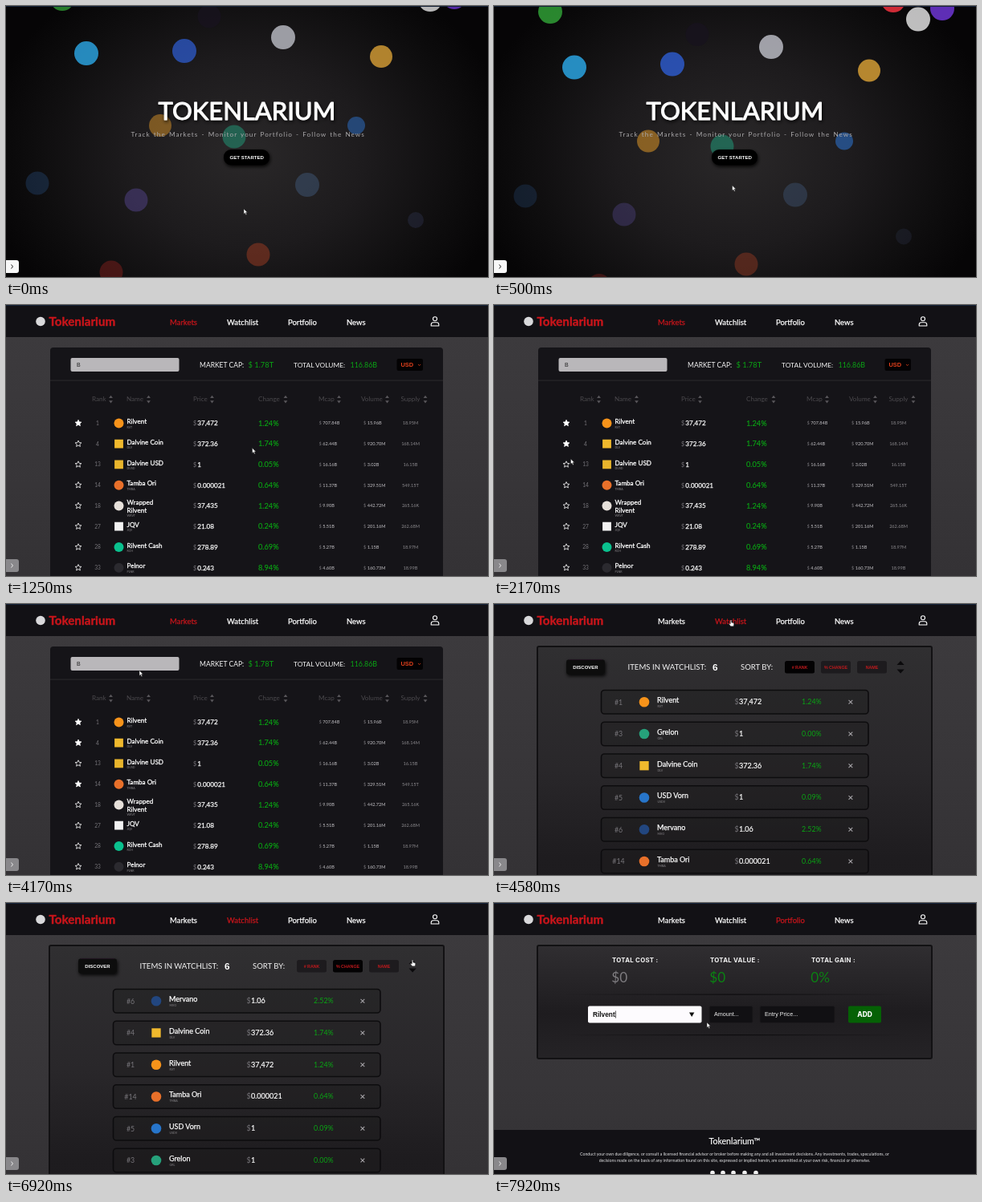
An HTML page that plays this animation: 600x338 px, repeating every 8000 ms.

```html
<!DOCTYPE html>
<html lang="en">
<head>
<meta charset="utf-8">
<title>Tokenlarium</title>
<style>
html, body { margin: 0; width: 100%; height: 100%; overflow: hidden; background: #111; }
svg { display: block; width: 100vw; height: 100vh; }
text { font-family: Lato, "Open Sans", sans-serif; white-space: pre; }
.ui { font-family: "Liberation Sans", Arial, sans-serif; }
.wide { font-family: Inter, sans-serif; }
</style>
</head>
<body>
<svg id="stage" viewBox="0 0 600 338" preserveAspectRatio="none">
  <defs>
    <radialGradient id="night" gradientUnits="userSpaceOnUse" cx="300" cy="185" r="330" gradientTransform="translate(0 40) scale(1 .78)">
      <stop offset="0" stop-color="#2a2829"/><stop offset=".45" stop-color="#1d1b1d"/>
      <stop offset=".8" stop-color="#0e0d0e"/><stop offset="1" stop-color="#060506"/>
    </radialGradient>
    <linearGradient id="page" x2="0" y2="1">
      <stop offset="0" stop-color="#3d3b3e"/><stop offset="1" stop-color="#343235"/>
    </linearGradient>
    <linearGradient id="board" x2="0" y2="1">
      <stop offset="0" stop-color="#302f31"/><stop offset=".5" stop-color="#29272a"/>
      <stop offset=".85" stop-color="#1e1c1f"/><stop offset="1" stop-color="#1d1b1e"/>
    </linearGradient>
    <linearGradient id="card" x2="0" y2="1">
      <stop offset="0" stop-color="#302e31"/><stop offset=".6" stop-color="#1e1c1f"/>
      <stop offset="1" stop-color="#252326"/>
    </linearGradient>
    <linearGradient id="rule">
      <stop offset="0" stop-color="#0c0b0d" stop-opacity="0"/><stop offset=".5" stop-color="#0c0b0d"/>
      <stop offset="1" stop-color="#0c0b0d" stop-opacity="0"/>
    </linearGradient>
    <filter id="drop" x="-20%" y="-40%" width="140%" height="200%">
      <feDropShadow dx="1" dy="2" stdDeviation="2" flood-color="#000" flood-opacity=".9"/>
    </filter>
  </defs>
</svg>
<script>
const LOOP = 8000;
const RED = '#c8151b', GREEN = '#0aa414', GREY = '#77757a', WHITE = '#f4f4f4';
const stage = document.getElementById('stage');

const text = (x, y, s, size, fill = WHITE, attrs = '') =>
  `<text x="${x}" y="${y}" font-size="${size}" fill="${fill}" ${attrs}>${s}</text>`;
const rect = (x, y, w, h, fill, attrs = '') =>
  `<rect x="${x}" y="${y}" width="${w}" height="${h}" fill="${fill}" ${attrs}/>`;
const dot = (x, y, r, fill, attrs = '') =>
  `<circle cx="${x}" cy="${y}" r="${r}" fill="${fill}" ${attrs}/>`;
const path = (d, attrs) => `<path d="${d}" ${attrs}/>`;
const firm = (color, w) => `stroke="${color}" stroke-width="${w}" stroke-linejoin="round"`;
const MID = 'text-anchor="middle"', BOLD = 'font-weight="700"', UI = 'class="ui"', WIDE = 'class="wide"';

function scene(markup) {
  const g = document.createElementNS('http://www.w3.org/2000/svg', 'g');
  g.innerHTML = markup;
  stage.appendChild(g);
  return g;
}
const show = (el, on) => el.setAttribute('display', on ? 'inline' : 'none');

// name, ticker, icon colour, square icon
const assets = {
  rvt: ['Rilvent', 'RVT', '#f7931a'],
  dlv: ['Dalvine Coin', 'DLV', '#f0b92d', 1],
  dusd: ['Dalvine USD', 'DUSD', '#e9b52c', 1],
  tmba: ['Tamba Ori', 'TMBA', '#e8702a'],
  wrvt: ['Wrapped|Rilvent', 'WRVT', '#e6e0da'],
  jqv: ['JQV', 'JQV', '#f2f2f2', 1],
  rch: ['Rilvent Cash', 'RCH', '#0ac18e'],
  plnr: ['Pelnor', 'PLNR', '#2b2a2f'],
  mvo: ['Mervano', 'MVO', '#22467f'],
  usdv: ['USD Vorn', 'USDV', '#2775ca'],
  grl: ['Grelon', 'GRL', '#26a17b']
};
const icon = (id, x, y, r) => assets[id][3]
  ? rect(x - r * .9, y - r * .9, r * 1.8, r * 1.8, assets[id][2])
  : dot(x, y, r, assets[id][2]);

// Home: x, y, speed, radius, opacity at start, opacity after 1 s
const coins = [
  ['#2aa0dc', 100, 59, 35, 15, .85, .88], ['#2f5fd8', 222, 56, 33, 15, .7, .85],
  ['#17131d', 253, 13, 45, 14.5, .9, .9], ['#b4b5bd', 345, 39, 24, 15, .85, .9],
  ['#d9a036', 467, 63, 35, 14, .8, .85], ['#d99427', 192, 149, 39, 14, .5, .62],
  ['#1f9d7c', 284, 163, 24, 14.5, .5, .55], ['#2c6cc0', 436, 149, 39, 11, .55, .7],
  ['#23466f', 39, 221, 32, 14.5, .42, .24], ['#5a4a9a', 162, 242, 36, 14.5, .45, .24],
  ['#405878', 375, 223, 25, 15, .5, .35], ['#343a58', 510, 267, 41, 10, .35, .15],
  ['#a03c22', 314, 310, 24, 14.5, .5, .36], ['#9c241e', 131, 332, 33, 14.5, .4, .25],
  ['#2f9a35', 70, -9, 32, 15, .8, .95], ['#d8d8d8', 528, -8, 49, 15, .85, .9],
  ['#6c35cf', 558, -11, 28, 15, .8, .95], ['#e02f3a', 497, -22, 30, 15, .9, .95]
];

const toggle = (fill, ink) => rect(-3, 317, 19, 16, fill, 'rx="3"') +
  path('M6.5 322.5l2 2.5l-2 2.5', `fill="none" stroke="${ink}" stroke-width="1"`);

const home = scene(
  rect(0, 0, 600, 338, 'url(#night)') +
  '<g>' + coins.map(c => dot(c[1], c[2], c[4], c[0])).join('') + '</g>' +
  rect(0, 0, 600, 1, '#16243a') +
  text(300, 142, 'TOKENLARIUM', 31, '#fff', `${MID} ${firm('#fff', .9)} filter="url(#drop)"`) +
  text(155.5, 163, 'Track the Markets - Monitor your Portfolio - Follow the News', 8.2, '#aaa8aa',
    'letter-spacing="1.04" word-spacing="1"') +
  rect(271, 179, 57, 19.5, '#050405', 'rx="9" filter="url(#drop)"') +
  text(299.7, 190.8, 'GET STARTED', 6.1, '#fff', `${UI} ${BOLD} ${MID}`) +
  toggle('#f8f8f8', '#222'));
const coinDots = [...home.querySelector('g').children];

const tabs = [['Markets', 204], ['Watchlist', 275], ['Portfolio', 351], ['News', 424]];
function chrome(active) {
  return rect(0, 0, 600, 40, '#121115') + rect(0, 0, 600, 1, '#16243a') +
    dot(43, 20.5, 5.8, '#d9d9db') +
    text(53.5, 25.5, 'Tokenlarium', 15.2, RED, `${BOLD} ${firm(RED, .4)}`) +
    tabs.map(([s, x], i) => {
      const c = i === active ? RED : '#fff';
      return text(x, 24.6, s, 9.5, c, firm(c, .25));
    }).join('') +
    `<g fill="none" stroke="#fff" stroke-width="1.1">${dot(534, 17.2, 2.5, 'none')}` +
    path('M529.2 26v-1.4q0-2.8 2.8-2.8h4q2.8 0 2.8 2.8V26z', 'stroke-linejoin="round"') + '</g>';
}
const backdrop = rect(0, 0, 600, 338, 'url(#page)');
const sideTab = toggle('#89888b', '#e8e8e8');

// Markets
const heads = [['Rank', 107, 130.5], ['Name', 150, 177.5], ['Price', 233, 256.5], ['Change', 314, 348],
  ['Mcap', 389, 414.5], ['Volume', 442, 474.5], ['Supply', 491.5, 522]];
const quotes = [
  ['rvt', 1, '37,472', '1.24', '707.84B', '15.96B', '18.95M'],
  ['dlv', 4, '372.36', '1.74', '62.44B', '920.70M', '168.14M'],
  ['dusd', 13, '1', '0.05', '16.16B', '3.02B', '16.15B'],
  ['tmba', 14, '0.000021', '0.64', '11.37B', '329.51M', '549.15T'],
  ['wrvt', 18, '37,435', '1.24', '9.90B', '442.72M', '265.16K'],
  ['jqv', 27, '21.08', '0.24', '5.51B', '201.16M', '262.68M'],
  ['rch', 28, '278.89', '0.69', '5.27B', '1.15B', '18.97M'],
  ['plnr', 33, '0.243', '8.94', '4.60B', '160.73M', '18.99B']
];
function star(x, y) {
  let d = '';
  for (let k = 0; k < 10; k++) {
    const a = k * Math.PI / 5, r = k % 2 ? 1.9 : 4.1;
    d += (k ? 'L' : 'M') + (x + r * Math.sin(a)).toFixed(2) + ' ' + (y - r * Math.cos(a)).toFixed(2);
  }
  return path(d + 'z', 'class="star" fill="none" stroke="#fff" stroke-width=".8" stroke-linejoin="round"');
}
function quote([id, rank, price, change, cap, vol, supply], i) {
  const y = 147.4 + 25.75 * i, lines = assets[id][0].split('|'), two = lines.length > 1;
  const money = (x, s) => text(x, y + 2, `<tspan fill="${GREY}">$</tspan> ${s}`, 5.6, '#c4c2c6');
  return star(90, y) +
    text(114, y + 2.4, rank, 6.6, GREY, MID) + icon(id, 140.5, y, 6) +
    lines.map((s, k) => text(150.5, y + .8 + (two ? k * 9.6 - 1.8 : 0), s, 8.1, '#fff', firm('#fff', .3))).join('') +
    text(150.5, y + (two ? 13.6 : 6.2), assets[id][1], 3.6, '#8a888c') +
    text(233, y + 3, '$', 7, GREY) + text(238.3, y + 3, price, 8.1, '#fff', firm('#fff', .25)) +
    text(314, y + 3.2, change + '%', 9.2, GREEN, firm(GREEN, .15)) +
    money(389.5, cap) + money(445, vol) + text(503.5, y + 2, supply, 5.6, '#8e8c90', MID);
}
const markets = scene(backdrop + chrome(0) +
  rect(55, 53, 489, 300, '#151418', 'rx="4"') +
  rect(80.5, 66, 135, 17, '#b9b7ba', 'rx="2"') + text(88, 77.2, 'B', 7, '#222', UI) +
  text(241, 78.2, 'MARKET CAP:', 8.5) + text(301.5, 78.4, '$ 1.78T', 9.3, GREEN) +
  text(358, 78.2, 'TOTAL VOLUME:', 8.4) + text(428.5, 78.4, '116.86B', 8.9, GREEN) +
  rect(486.5, 67, 32.5, 15, '#030203', 'rx="2"') + text(491.5, 77.2, 'USD', 7.4, '#e2401c', `${UI} ${BOLD}`) +
  path('M513 74l1.6 1.6l1.6-1.6', 'fill="none" stroke="#e2401c" stroke-width=".8"') +
  rect(55, 93.6, 489, 1, '#2c2a2e') +
  heads.map(([s, x, a]) => text(x, 120.2, s, 8.1, '#4b494d') +
    path(`M${a - 2.4} 116l2.4-3.2l2.4 3.2zM${a - 2.4} 119.2l2.4 3.2l2.4-3.2z`, 'fill="#59575b"')).join('') +
  quotes.map(quote).join('') + sideTab);
const stars = markets.querySelectorAll('.star');

// Watchlist
const held = [
  ['mvo', 6, '1.06', '2.52'], ['dlv', 4, '372.36', '1.74'], ['rvt', 1, '37,472', '1.24'],
  ['tmba', 14, '0.000021', '0.64'], ['usdv', 5, '1', '0.09'], ['grl', 3, '1', '0.00']
];
const item = ([id, rank, price, change]) => '<g class="item">' +
  rect(133.5, 107.5, 332.5, 29.5, '#1b1a1c', 'fill-opacity=".35" rx="4" stroke="#0d0c0e" stroke-width="1.6"') +
  text(155, 125.6, '#' + rank, 8.8, GREY, MID) + icon(id, 187, 122.2, 6.3) +
  text(203, 123.2, assets[id][0], 9, '#fff', firm('#fff', .25)) +
  text(203.5, 129, assets[id][1], 3.6, '#8a888c') +
  text(299.5, 125.2, '$', 8.8, GREY) + text(305, 125.2, price, 9, '#fff', firm('#fff', .2)) +
  text(383, 125.2, change + '%', 8.9, GREEN) +
  path('M441.5 119.8l4.8 4.8m0-4.8l-4.8 4.8', 'stroke="#a3a1a5" stroke-width="1.1"') + '</g>';
const chips = [['# RANK', 362], ['% CHANGE', 407], ['NAME', 452]];
const watch = scene(backdrop + chrome(1) +
  rect(54, 53, 491, 310, 'url(#board)', 'rx="2" stroke="#121113" stroke-width="2"') +
  rect(90, 69.5, 48, 18.5, '#0e0d0f', 'rx="3" filter="url(#drop)"') +
  text(114, 81, 'DISCOVER', 6, '#fff', `${UI} ${BOLD} ${MID}`) +
  text(166.5, 82.2, 'ITEMS IN WATCHLIST:', 9.6) + text(272, 83, '6', 11.8, '#fff', `${UI} ${BOLD}`) +
  text(307, 82.2, 'SORT BY:', 9.5) +
  chips.map(([s, x]) => rect(x, 71, 37, 15.5, '#1d1b1e', 'class="chip" rx="2.5"') +
    text(x + 18.5, 80.8, s, 5.3, '#c01a1d', `${UI} ${BOLD} ${MID}`)).join('') +
  path('M501.5 76l4.6-5l4.6 5zM501.5 81.5l4.6 5l4.6-5z', 'fill="#0b0a0c"') +
  held.map(item).join('') + sideTab);
const items = watch.querySelectorAll('.item'), chipBoxes = watch.querySelectorAll('.chip');

// Portfolio
const field = (x, w, s) => rect(x, 128.5, w, 21, '#111013', 'rx="2" stroke="#1c1a1d"') +
  text(x + 6, 141.4, s, 7.2, '#f0f0f0', UI);
const total = (x, s, v, c) => text(x, 74, s, 7.8, WHITE, `${WIDE} ${BOLD} letter-spacing=".3"`) +
  text(x - .8, 99, v, 17.2, c);
const portfolio = scene(backdrop + chrome(2) +
  rect(54, 53, 491, 141, 'url(#card)', 'rx="2" stroke="#121113" stroke-width="2"') +
  total(147, 'TOTAL COST :', '$0', '#7d7b7f') + total(269, 'TOTAL VALUE :', '$0', '#0b8213') +
  total(395, 'TOTAL GAIN :', '0%', '#0b8213') +
  rect(85, 113.5, 430, 1.2, 'url(#rule)') + rect(85, 164, 430, 1.2, 'url(#rule)') +
  rect(117, 128.5, 141.5, 21, '#fdfbfe', 'rx="2"') +
  text(123, 141.8, '', 8.3, '#111', `${UI} ${BOLD} id="pick"`) +
  rect(154, 134.5, .8, 9, '#333', 'id="caret"') +
  path('M243 136.5h6.4l-3.2 5.6z', 'fill="#111"') +
  field(268, 54, 'Amount...') + field(331, 93, 'Entry Price...') +
  rect(441, 128.5, 41, 21, '#056105', 'rx="2"') +
  text(461.5, 142, 'ADD', 8.4, '#fff', `${WIDE} font-weight="800" ${MID}`) +
  rect(0, 283, 600, 55, '#121115') +
  text(299.5, 300.6, 'Tokenlarium™', 10.6, '#fff', `${MID} ${firm('#fff', .15)}`) +
  text(299.5, 314.6, 'Conduct your own due diligence, or consult a licensed financial advisor or broker before making any and all investment decisions. Any investments, trades, speculations, or', 5.2, '#e4e4e6', MID) +
  text(299.5, 322.7, 'decisions made on the basis of any information found on this site, expressed or implied herein, are committed at your own risk, financial or otherwise.', 5.2, '#e4e4e6', MID) +
  [272, 285, 298, 312, 326].map(x => dot(x, 336.6, 2.8, '#f0f0f0')).join('') + sideTab);
const pick = document.getElementById('pick'), caret = document.getElementById('caret');

// Pointer
const pointer = scene(
  path('M0 0v6.4l1.5-1.3l1.1 2.4l1.1-.5l-1.1-2.4h2z', 'fill="#fff" stroke="#222" stroke-width=".5"') +
  path('M-.7.5q.7-1 1.4 0v2.6l2.4.7q.8.3.6 1.2l-.5 2.8h-3.6l-2-2.7q-.3-.9.6-.8l1.1.8z',
    'fill="#fff" stroke="#222" stroke-width=".4"'));
const [arrow, hand] = pointer.children;
const route = [
  [0, 296, 253], [80, 296, 253], [900, 297, 197], [1200, 299, 192], [1330, 321, 152],
  [1669, 321, 152], [1670, 89, 168], [1830, 89, 168], [2170, 95.5, 192], [2580, 310, 178],
  [3000, 336, 240], [3170, 89, 222], [3420, 89, 222], [4080, 166, 83], [4250, 166, 83],
  [4500, 295, 20], [4680, 295, 20], [5000, 425, 78], [5170, 425, 78], [5500, 505.5, 81],
  [6100, 505.5, 81], [6400, 506, 71], [6930, 506, 71], [7120, 369, 20], [7250, 369, 20],
  [7500, 190, 138], [7720, 190, 138], [7900, 265, 149], [LOOP, 265, 149]
];
function locate(t) {
  let i = 1;
  while (route[i][0] < t) i++;
  const [a, x, y] = route[i - 1], [b, u, v] = route[i];
  const k = (t - a) / (b - a), e = k * k * (3 - 2 * k);
  return [x + (u - x) * e, y + (v - y) * e];
}
const within = (t, a, b) => t >= a && t < b;

const orders = {
  rank: held.map((r, i) => i).sort((a, b) => held[a][1] - held[b][1]),
  down: [0, 1, 2, 3, 4, 5],
  up: [5, 4, 3, 2, 1, 0]
};

function draw(t) {
  show(home, t < 1200);
  show(markets, within(t, 1200, 4580));
  show(watch, within(t, 4580, 7170));
  show(portfolio, t >= 7170);

  const s = t / 1000;
  coins.forEach(([, , y, v, , from, to], i) => {
    coinDots[i].setAttribute('cy', y + v * s);
    coinDots[i].setAttribute('opacity', from + (to - from) * Math.min(s, 1));
  });

  stars.forEach((el, i) => {
    const on = i === 0 || (i === 1 && t >= 1830) || (i === 3 && t >= 3250);
    el.setAttribute('fill', on ? '#fff' : 'none');
  });

  const sort = t < 5080 ? 'rank' : within(t, 6000, 6500) ? 'up' : 'down';
  orders[sort].forEach((id, place) =>
    items[id].setAttribute('transform', `translate(0 ${39.75 * place})`));
  chipBoxes.forEach((el, i) =>
    el.setAttribute('fill', i === (sort === 'rank' ? 0 : 1) ? '#030203' : '#1d1b1e'));

  const n = Math.max(0, Math.min(7, Math.floor((t - 7520) / 45)));
  const typed = assets.rvt[0].slice(0, n);
  if (pick.textContent !== typed) pick.textContent = typed;
  show(caret, t >= 7500);
  caret.setAttribute('x', 123.4 + (n ? pick.getComputedTextLength() : 0));

  const [x, y] = locate(t);
  pointer.setAttribute('transform', `translate(${x.toFixed(2)} ${y.toFixed(2)})`);
  const pointing = within(t, 1670, 1900) || within(t, 3150, 3500) || within(t, 4450, 4700) ||
    within(t, 4950, 5200) || within(t, 5450, 7000) || within(t, 7080, 7280);
  show(arrow, !pointing);
  show(hand, pointing);
}

const begin = performance.now();
function tick() {
  draw((performance.now() - begin) % LOOP);
  requestAnimationFrame(tick);
}
draw(0);
requestAnimationFrame(tick);
</script>
</body>
</html>
```
